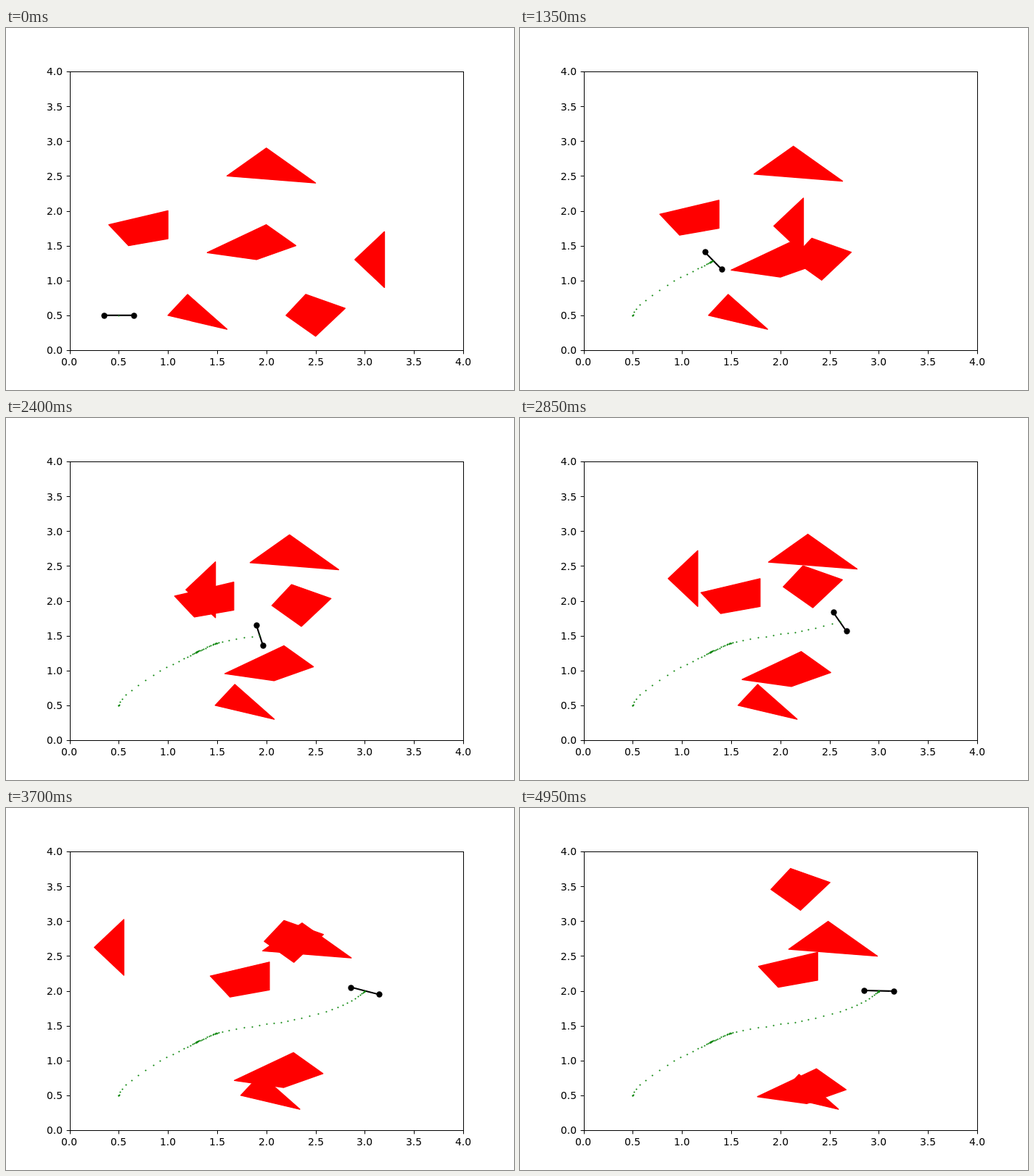
An HTML page for the animation above (5000 ms loop, 700x500 px).

```html
<!DOCTYPE html>
<html lang="en">
<head>
<meta charset="utf-8">
<title>Moving obstacles</title>
<style>
  html, body { margin: 0; width: 100%; height: 100%; overflow: hidden; background: #fff; }
  svg { display: block; }
  text { font: 13.89px "DejaVu Sans", sans-serif; }
  .axis { fill: none; stroke: #000; stroke-width: 1; }
  .obstacle { fill: #f00; stroke: #f00; stroke-width: 1.39; stroke-linejoin: round; }
  .link { stroke: #000; stroke-width: 2.08; stroke-linecap: square; }
  .trail { fill: #008000; }
</style>
</head>
<body>
<svg width="700" height="500" viewBox="0 0 700 500">
  <clipPath id="plot"><rect x="87.5" y="60" width="542.5" height="385"/></clipPath>
  <g id="scene" clip-path="url(#plot)"></g>
  <g id="axes"></g>
</svg>
<script>
const STEP = 50, STEPS = 100;
const UX = 135.625, UY = 96.25;
const px = x => 87.5 + x * UX;
const py = y => 445 - y * UY;
const crisp = v => Math.floor(v + 0.5) + 0.5;

const scene = document.getElementById('scene');
const axes = document.getElementById('axes');

function set(el, attrs) {
  for (const name in attrs) el.setAttribute(name, attrs[name]);
}
function add(parent, tag, attrs, text) {
  const el = document.createElementNS('http://www.w3.org/2000/svg', tag);
  set(el, attrs);
  if (text) el.textContent = text;
  parent.appendChild(el);
  return el;
}

// Axes frame, ticks and labels
add(axes, 'rect', { class: 'axis', x: 88.5, y: 60.5, width: 542, height: 385 });
for (let v = 0; v <= 4; v += 0.5) {
  const label = v.toFixed(1), x = px(v), y = py(v);
  add(axes, 'path', { class: 'axis', d: `M${crisp(x)} 445.5v4.86M88.5 ${crisp(y)}h-4.86` });
  add(axes, 'text', { x: Math.round(x - 11.05), y: 466 }, label);
  add(axes, 'text', { x: 56, y: Math.round(y + 5.49) }, label);
}

// Obstacles drift along a direction at constant speed per step
const obstacles = [
  { pts: [[0.4, 1.8], [1, 2], [1, 1.6], [0.6, 1.5]], dir: [5, 2], speed: 0.015 },
  { pts: [[1.4, 1.4], [2, 1.8], [2.3, 1.5], [1.9, 1.3]], dir: [2, -5], speed: 0.01 },
  { pts: [[1.6, 2.5], [2, 2.9], [2.5, 2.4]], dir: [5, 1], speed: 0.005 },
  { pts: [[1, 0.5], [1.2, 0.8], [1.6, 0.3]], dir: [1, 0], speed: 0.01 },
  { pts: [[2.2, 0.5], [2.4, 0.8], [2.8, 0.6], [2.5, 0.2]], dir: [-1, 10], speed: 0.03 },
  { pts: [[2.9, 1.3], [3.2, 1.7], [3.2, 0.9]], dir: [-2, 1], speed: 0.04 }
];
for (const o of obstacles) {
  const rate = o.speed / Math.hypot(...o.dir);
  o.vx = o.dir[0] * rate * UX;
  o.vy = -o.dir[1] * rate * UY;
  o.el = add(scene, 'polygon', {
    class: 'obstacle',
    points: o.pts.map(([x, y]) => px(x) + ',' + py(y)).join(' ')
  });
}

// Waypoints of the robot: step, x, y
const route = [
  [1, 0.5, 0.5], [5, 0.574, 0.652], [10, 0.919, 0.995], [14, 1.161, 1.169],
  [18, 1.266, 1.247], [27, 1.318, 1.285], [36, 1.467, 1.377], [42, 1.515, 1.403],
  [44, 1.618, 1.432], [48, 1.931, 1.509], [51, 2.149, 1.553], [54, 2.356, 1.608],
  [57, 2.603, 1.702], [62, 2.864, 1.86], [66, 2.969, 1.962], [72, 3, 2]
];
const LAST = route.length - 1;

// Cubic through the waypoints, at rest at both ends
function slope(i, axis) {
  if (i === 0 || i === LAST) return 0;
  const a = route[i - 1], b = route[i + 1];
  return (b[axis] - a[axis]) / (b[0] - a[0]);
}
function place(k, axis) {
  const t = Math.min(Math.max(k, route[0][0]), route[LAST][0]);
  let i = 0;
  while (i < LAST - 1 && route[i + 1][0] <= t) i++;
  const a = route[i], b = route[i + 1], h = b[0] - a[0];
  const u = (t - a[0]) / h, w = 1 - u;
  return a[axis] * w * w * (1 + 2 * u) + b[axis] * u * u * (3 - 2 * u)
    + h * u * w * (slope(i, axis) * w - slope(i + 1, axis) * u);
}

// The link lies across the direction of travel, then levels out at the goal
const ARRIVE = 66;
function tilt(k) {
  if (k > ARRIVE) return tilt(ARRIVE) * Math.pow(0.91, k - ARRIVE);
  const v = axis => place(k + 0.5, axis) - place(k - 0.5, axis);
  return Math.atan2(v(2) + 0.0005, v(1)) - Math.PI / 2;
}

const poses = Array.from({ length: STEPS }, (_, k) => {
  const a = tilt(k);
  return {
    x: px(place(k, 1)), y: py(place(k, 2)),
    dx: 0.15 * Math.cos(a) * UX, dy: -0.15 * Math.sin(a) * UY
  };
});

const link = add(scene, 'line', { class: 'link' });
const ends = [-1, 1].map(side => ({ side, el: add(scene, 'circle', { r: 4.17 }) }));
const trail = poses.map(p =>
  add(scene, 'circle', { class: 'trail', cx: crisp(p.x), cy: crisp(p.y), r: 1.04 }));

function draw(k) {
  for (const o of obstacles) {
    o.el.setAttribute('transform', `translate(${o.vx * k} ${o.vy * k})`);
  }
  const { x, y, dx, dy } = poses[k];
  set(link, { x1: x - dx, y1: y - dy, x2: x + dx, y2: y + dy });
  for (const { side, el } of ends) {
    set(el, { cx: crisp(x + side * dx), cy: crisp(y + side * dy) });
  }
  trail.forEach((el, i) => { el.style.display = i <= k ? '' : 'none'; });
}

let start = null, shown = 0;
function tick(now) {
  if (start === null) start = now;
  const k = Math.floor((now - start) / STEP) % STEPS;
  if (k !== shown) draw(shown = k);
  requestAnimationFrame(tick);
}
draw(0);
requestAnimationFrame(tick);
</script>
</body>
</html>
```
